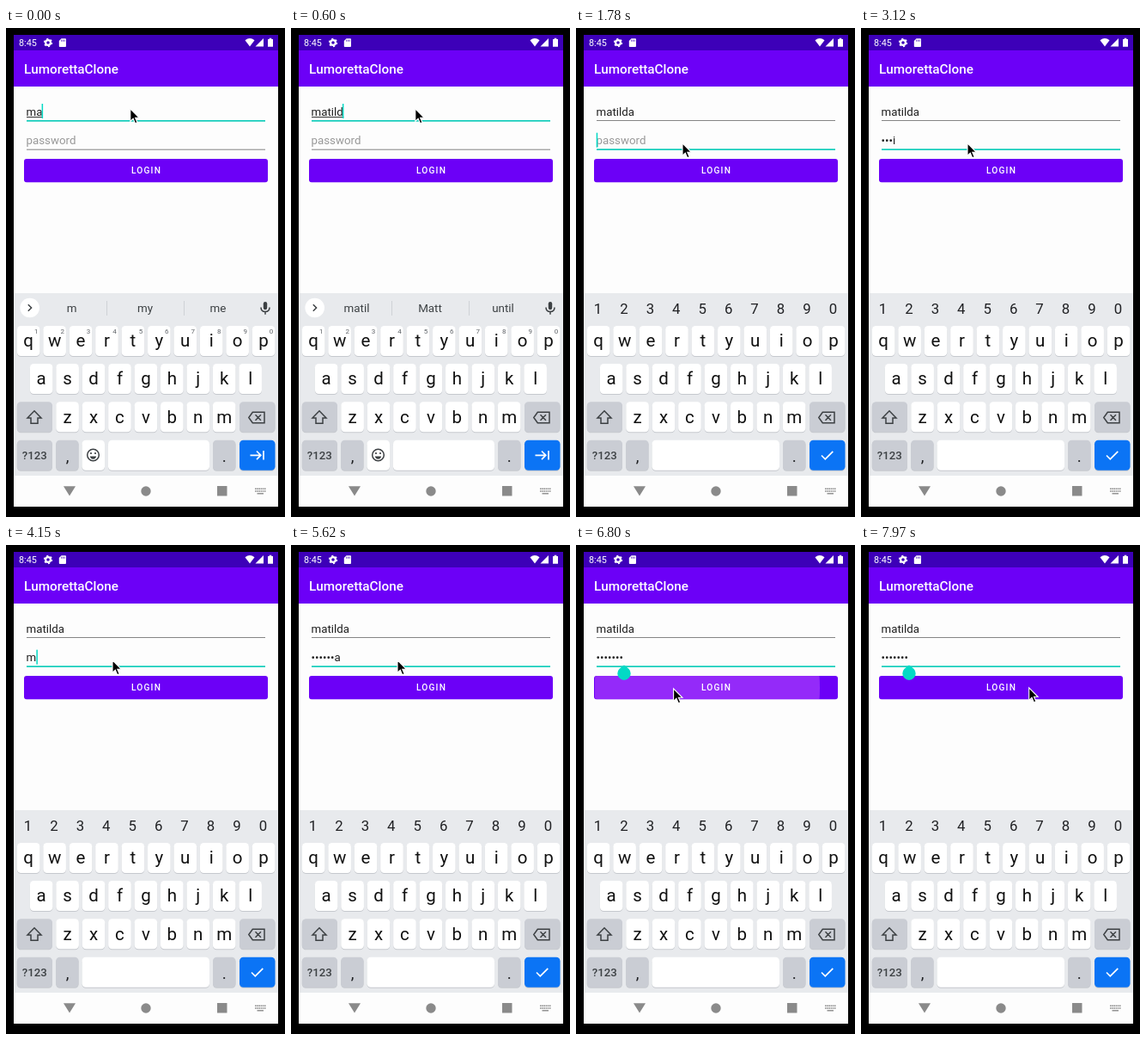
An HTML page for the animation above (8 s loop, 325x568 px).

```html
<!DOCTYPE html>
<html lang="en">
<head>
<meta charset="utf-8">
<title>Login screen</title>
<style>
html, body { margin: 0; width: 100%; height: 100%; overflow: hidden; background: #000; }
svg { display: block; width: 325px; height: 568px; font-family: Roboto, sans-serif; }
text { white-space: pre; }
.mid { text-anchor: middle; }
.line { fill: none; stroke: #3c4043; stroke-width: 1.5; }
.white { stroke: #fff; stroke-width: 1.7; }
</style>
</head>
<body>
<svg viewBox="0 0 325 568" xmlns="http://www.w3.org/2000/svg">
  <defs>
    <clipPath id="btnClip"><rect x="22" y="152" width="282.5" height="27" rx="2.5"/></clipPath>
  </defs>
  <rect width="325" height="568"/>
  <rect x="9" y="8" width="308" height="548" fill="#fdfdfd"/>
  <rect x="9" y="8" width="308" height="18" fill="#3d00b8"/>
  <rect x="9" y="26" width="308" height="42" fill="#6c00f7"/>

  <g fill="#fff">
    <text x="15" y="21" font-size="10.8">8:45</text>
    <circle cx="49" cy="17" r="2.9" fill="none" stroke="#fff" stroke-width="2.2"/>
    <circle cx="49" cy="17" r="4.4" fill="none" stroke="#fff" stroke-width="1.5" stroke-dasharray="2.1 2.508"/>
    <path d="M64.5 12.2h4.6q.9 0 .9.9v8q0 .9-.9.9h-6.4q-.9 0-.9-.9v-6.200z"/>
    <path d="M64.6 13.700v2M66.500 13.700v2M68.300 13.700v2" stroke="#3d00b8" stroke-width=".8"/>
    <path d="M278.500 14.200q5.500-4.200 11 0l-5.500 7.300z"/>
    <path d="M300 12v9.500h-9.500z"/>
    <path d="M306.700 11.800h2.600v1.100h1.700v8.900h-6v-8.900h1.700z"/>
    <text x="21" y="53" font-size="15.3" font-weight="500">LumorettaClone</text>
  </g>

  <g font-size="13.3" fill="#202020">
    <text id="name" x="23.500" y="101.500"></text>
    <text id="hint" x="23.500" y="135.300" fill="#989898">password</text>
    <text id="pass" x="23.500" y="135.300"></text>
  </g>
  <rect id="compose" x="24" y="103" height="1" fill="#333"/>
  <rect id="nameLine" x="24" width="278"/>
  <rect id="passLine" x="24" width="278"/>
  <rect id="caret" width="1.5" height="17" fill="#03dac5"/>

  <rect x="21" y="152" width="284" height="27.300" rx="3" fill="#6c00f7"/>
  <circle id="ripple" cx="113" cy="166" fill="#942af9" clip-path="url(#btnClip)"/>
  <text x="146" y="169.300" font-size="10.2" font-weight="500" letter-spacing="1.15" fill="#fff">LOGIN</text>
  <path id="handle" d="M56 139.500l5.400 4.200a7.700 7.700 0 1 1-10.800 0z" fill="#03dac5"/>

  <rect x="9" y="308" width="308" height="212" fill="#e8eaed"/>
  <g id="keys"></g>
  <g id="suggest">
    <circle cx="27.700" cy="325" r="11.300" fill="#fff"/>
    <path class="line" d="M25.800 321.200l3.800 3.800-3.800 3.800"/>
    <path d="M117.500 317v17M207.500 317v17" stroke="#cfd2d6"/>
    <g class="mid" font-size="13.4" fill="#3c4043">
      <text x="76.500" y="330"></text><text x="162" y="330"></text><text x="247" y="330"></text>
    </g>
    <rect x="299.800" y="318" width="4.400" height="9.300" rx="2.200" fill="#3c4043"/>
    <path class="line" d="M297 324.500q0 5 5 5t5-5M302 329.500v3.300" stroke-width="1.300"/>
  </g>
  <g id="digits" class="mid" font-size="16.800" fill="#202124"></g>

  <path class="line" d="M33 444.800l8 8.200h-4v6.200h-8v-6.200h-4z"/>
  <path class="line" d="M287.300 446.300h13.700v12.400h-13.700l-4.500-6.200zM290.500 449.300l6.400 6.400M296.900 449.300l-6.400 6.400"/>
  <path id="tab" class="line white" d="M284.500 496.300h12M292 491.500l4.800 4.800-4.800 4.800M300 491v10.600"/>
  <path id="check" class="line white" d="M286 496.500l4.300 4.300 9-9"/>
  <g id="smile">
    <circle class="line" cx="101.500" cy="496" r="6.800" stroke-width="1.300"/>
    <circle cx="99" cy="494" r="1.100" fill="#3c4043"/><circle cx="104" cy="494" r="1.100" fill="#3c4043"/>
    <path d="M97.800 497.500h7.400q-1 3.300-3.700 3.300t-3.700-3.300z" fill="#3c4043"/>
  </g>

  <g fill="#8a8a8a">
    <path d="M67 532.300h14l-7 11.200z"/>
    <circle cx="163" cy="538" r="5.700"/>
    <rect x="246" y="532" width="11.500" height="11.500"/>
    <path d="M290 535.300h12.500M290 538h12.500" stroke="#8a8a8a" stroke-width="1.600" stroke-dasharray="1.600 .6"/>
    <path d="M292.500 540.800h7.500" stroke="#8a8a8a" stroke-width="1.400"/>
  </g>

  <path id="mouse" d="M0 0V14.600L3.300 11.500L5.700 17L8.200 15.900L5.800 10.500H10.400Z" stroke="#fff" stroke-width="1.100"/>
</svg>
<script>
const LOOP = 8000;
const $ = id => document.getElementById(id);
const NAME = "matilda";

function make(parent, tag, attrs, label) {
  const el = document.createElementNS("http://www.w3.org/2000/svg", tag);
  for (const k in attrs) el.setAttribute(k, attrs[k]);
  if (label) el.textContent = label;
  parent.append(el);
  return el;
}

// keyboard
const keys = $("keys");
const PITCH = 30.43;
function key(x, y, w, fill = "#fff") {
  const g = make(keys, "g", {});
  make(g, "rect", { x, y: y + 1, width: w, height: 35, rx: 4.5, fill: "#c6c9ce" });
  make(g, "rect", { x, y, width: w, height: 35, rx: 4.5, fill });
  return g;
}
function label(x, y, size, str, fill = "#111", weight = 400) {
  make(keys, "text", { x, y, class: "mid", "font-size": size, fill, "font-weight": weight }, str);
}
[["qwertyuiop", 26.2, 346], ["asdfghjkl", 41.2, 390], ["zxcvbnm", 71.6, 434.3]].forEach(([row, x0, y], r) => {
  [...row].forEach((ch, i) => {
    const x = x0 + i * PITCH;
    key(x - 13.3, y, 26.6);
    label(x, y + 24.3, 20.5, ch);
    if (r === 0) label(x + 9, y + 9.3, 8, String((i + 1) % 10), "#5f6368");
  });
});
const GREY = "#cacdd4";
key(12.8, 434.3, 41.2, GREY);
key(272, 434.3, 41.5, GREY);
key(12.8, 478.7, 41.2, GREY);
key(58.2, 478.7, 26.4, GREY);
const emojiKey = key(88.5, 478.7, 26.5);
const shortSpace = key(119, 478.7, 118);
const longSpace = key(88.5, 478.7, 148.5);
key(241, 478.7, 26.5, GREY);
key(272, 478.7, 41.5, "#0b74f5");
label(33.3, 501.2, 13.2, "?123", "#3c4043", 500);
label(71.5, 503.5, 19, ",", "#202124");
label(254.3, 503.5, 19, ".", "#202124");
// digit hints sit only on the word layout
const hints = [...keys.querySelectorAll('text[font-size="8"]')];
for (let i = 0; i < 10; i++)
  make($("digits"), "text", { x: 25.5 + i * PITCH, y: 331.7 }, String((i + 1) % 10));

// timelines: [start, value]
const nameLen = [[0, 2], [150, 3], [300, 4], [450, 5], [600, 6], [740, 7]];
const words = [
  [0, "m my me"], [150, "ma may man"], [300, "mat May math"], [450, "mati Mat mate"],
  [600, "matil Matt until"], [740, "matild Matilda mild"], [890, "matilda Matilda Matilda's"]
];
// password length; negative means every character is masked
const passLen = [
  [0, 0], [2230, 1], [2380, 3], [2530, 4], [3270, -3], [3560, -1], [3700, 0],
  [4150, 1], [4300, 2], [4450, 3], [4590, 4], [4740, 5], [4880, 6], [5020, 7], [6510, -7]
];
const caretOn = [
  [0, 1], [3120, 0], [3270, 1], [5620, 0], [6060, 1], [6800, 0], [7090, 1], [7530, 0]
];
const mousePos = [
  [0, [144.8, 93.8]], [1190, [139.800, 104.800]], [1340, [129, 125]], [1480, [124, 133.800]],
  [5760, [122, 146]], [6060, [117, 154]], [6210, [114, 163]], [6360, [113.600, 166.800]],
  [7970, [195.700, 165.800]]
];
const rippleR = [[0, 0], [6800, 171], [6940, 230], [7090, 0]];

const at = (list, t) => list.reduce((v, s) => (t >= s[0] ? s[1] : v), list[0][1]);
const show = (el, on) => el.setAttribute("visibility", on ? "visible" : "hidden");

function underline(el, y, focused) {
  el.setAttribute("y", y);
  el.setAttribute("height", focused ? 1.7 : 1);
  el.setAttribute("fill", focused ? "#13cdbb" : "#858585");
}

function draw(t) {
  const inPass = t >= 1630, passKeys = t >= 1780;
  const n = at(passLen, t), len = Math.abs(n);
  $("name").textContent = NAME.slice(0, at(nameLen, t));
  $("pass").textContent = n > 0 ? "•".repeat(n - 1) + NAME[n - 1] : "•".repeat(len);
  show($("hint"), !len);

  const nameW = $("name").getComputedTextLength();
  show($("compose"), !inPass);
  $("compose").setAttribute("width", nameW);
  underline($("nameLine"), 107, !inPass);
  underline($("passLine"), inPass ? 140.300 : 140.700, inPass);

  const passW = len ? $("pass").getComputedTextLength() : 0;
  $("caret").setAttribute("x", 23.700 + (inPass ? passW : nameW) - (inPass ? 0 : 1));
  $("caret").setAttribute("y", inPass ? 121.700 : 88);
  show($("caret"), at(caretOn, t));

  $("suggest").querySelectorAll("text").forEach((el, i) => {
    el.textContent = at(words, t).split(" ")[i];
  });
  [$("suggest"), $("tab"), $("smile"), emojiKey, shortSpace, ...hints].forEach(el => show(el, !passKeys));
  [$("digits"), $("check"), longSpace].forEach(el => show(el, passKeys));

  show($("handle"), t >= 6360);
  $("ripple").setAttribute("r", at(rippleR, t));
  $("mouse").setAttribute("transform", `translate(${at(mousePos, t)})`);
}

const start = performance.now();
function frame() {
  draw((performance.now() - start) % LOOP);
  requestAnimationFrame(frame);
}
draw(0);
requestAnimationFrame(frame);
</script>
</body>
</html>
```
